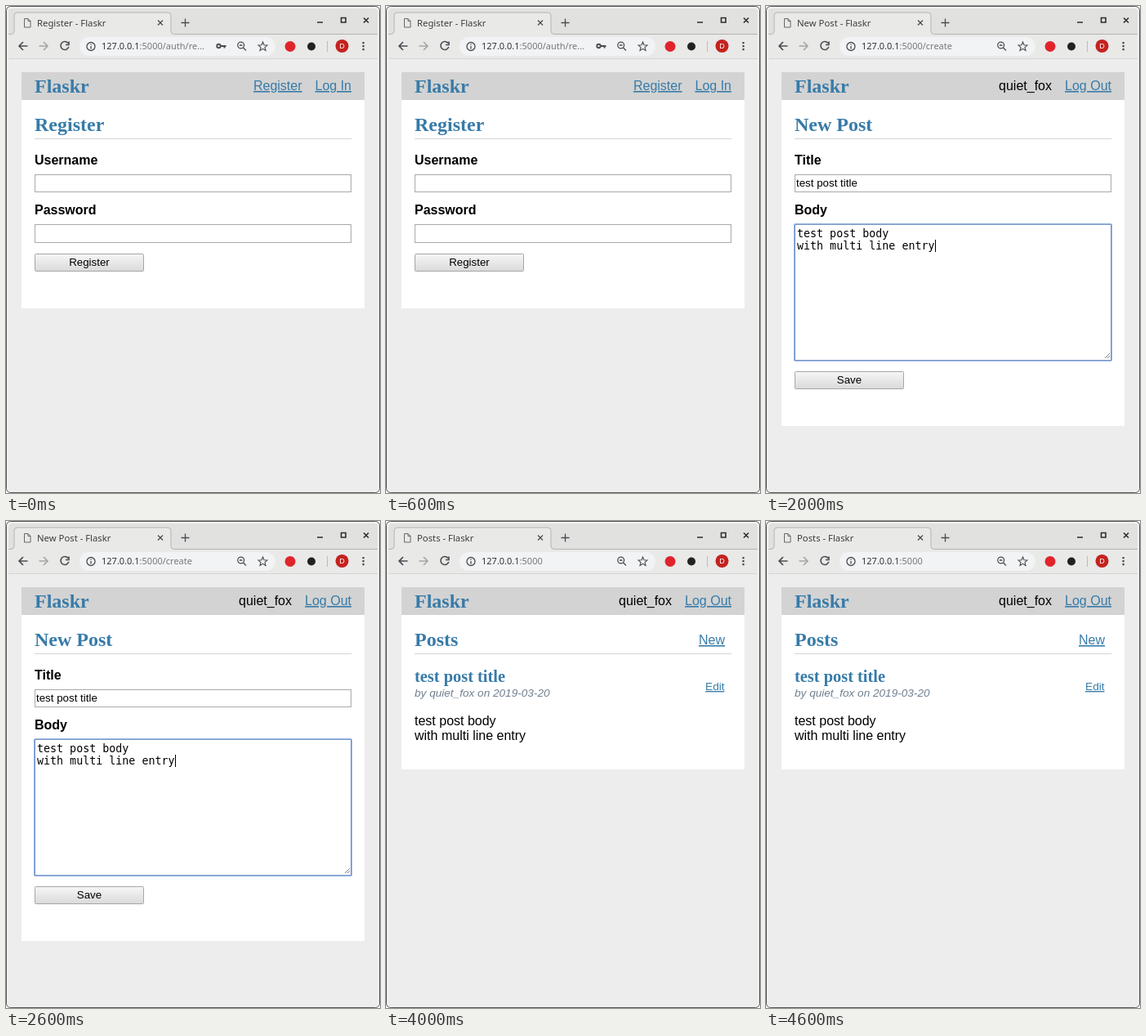
Write an HTML page that moves like this. It is 458x596 px and loops after 5 s.

```html
<!DOCTYPE html>
<html lang="en">
<head>
<meta charset="utf-8">
<title>Blog walkthrough</title>
<style>
html, body { margin: 0; width: 100%; height: 100%; overflow: hidden; background: #fff; }
svg { display: block; width: 458px; height: 596px; }
text { font: 16px "Liberation Sans", Arial, sans-serif; white-space: pre; }
.head { font: bold 24px "Liberation Serif", Times, serif; fill: #377ba8; }
.post { font-size: 20.4px; }
.label { font-weight: bold; }
.link { fill: #377ba8; text-decoration: underline; }
.field { font-size: 13.33px; }
.small { font-size: 13.6px; }
.about { font-size: 13.6px; font-style: italic; fill: #708090; }
.code { font: 13.33px "DejaVu Sans Mono", monospace; }
.tab { font: 11.3px "Noto Sans", sans-serif; fill: url(#fade); }
.url { font: 11px "Noto Sans", sans-serif; fill: #333; }
.icon { fill: none; stroke: #4a4d50; stroke-width: 1.3; }
</style>
</head>
<body>
<svg viewBox="0 0 458 596">
  <defs>
    <linearGradient id="fade" gradientUnits="userSpaceOnUse" x1="164" x2="181">
      <stop stop-color="#3c3c3c"/><stop offset="1" stop-color="#3c3c3c" stop-opacity="0"/>
    </linearGradient>
    <linearGradient id="face" x2="0" y2="1">
      <stop stop-color="#f6f6f6"/><stop offset="1" stop-color="#dadada"/>
    </linearGradient>
  </defs>
  <rect x=".5" y=".5" width="457" height="595" rx="5" fill="#f3f3f3" stroke="#555"/>
  <path d="M3 35V7q0-4 4-4H451q4 0 4 4V35z" fill="#e1e1e0"/>
  <path d="M3 34h452v30H3z" fill="#e9e9e8"/>
  <path d="M3 65h452v529H3z" fill="#ededed"/>
  <path d="M3 64.5H455" stroke="#d6d6d6"/>
  <path d="M3 34.5H6q4 0 4-4V12q0-4 4-4H198q4 0 4 4V30.500q0 4 4 4H455" fill="#e9e9e8" stroke="#b4b4b2"/>
  <rect x="90" y="38" width="240" height="23" rx="11.500" fill="#f1f3f4"/>
  <g class="icon">
    <path d="M22.500 15.500h4.500l3 3v7.500h-7.500zM27 15.500v3h3" stroke="#666" stroke-width="1"/>
    <path d="M186 17.500l6 6m0-6l-6 6M214.500 20.500h10m-5-5v10"/>
    <path d="M381 20h7M410.500 14.500h5.500v5.500h-5.500zM438 14.500l6 6m0-6l-6 6" stroke="#2e2e2e" stroke-width="1.6"/>
    <path d="M26.500 49H16m5-5l-5 5 5 5" stroke-width="1.6"/>
    <path d="M40.500 49H51m-5-5l5 5-5 5" stroke="#a5a5a5" stroke-width="1.6"/>
    <path d="M76 45.500a5 5 0 1 0 .8 4.500M77 43.500v4h-4" stroke-width="1.6"/>
    <circle cx="104" cy="49.500" r="5"/><path d="M104 49v3.500m0-6v1.300"/>
    <circle cx="287.700" cy="48" r="3.900"/><path d="M290.500 51l3.500 3.500M286 48h3.500"/>
    <path d="M314.500 44l1.500 3.700 4 .3-3 2.600 1 3.900-3.500-2.100-3.500 2.100 1-3.900-3-2.600 4-.3z" stroke-width="1.1"/>
    <path d="M393.500 43v13" stroke="#bbb" stroke-width="1"/>
  </g>
  <g id="key" class="icon"><circle cx="260.500" cy="49" r="2.200" stroke-width="1.900"/><path d="M263 49h6.500m-2 0v2.500" stroke-width="1.900"/></g>
  <circle cx="348" cy="49.500" r="6.500" fill="#e0242c"/>
  <circle cx="374" cy="49.500" r="5" fill="#222"/>
  <circle cx="411.500" cy="49" r="8" fill="#c5221f"/>
  <text x="411.500" y="52.300" text-anchor="middle" fill="#fff" style="font-size:9px">D</text>
  <path d="M436.500 44h2.200v2.200h-2.200zm0 4h2.200v2.200h-2.200zm0 4h2.200v2.200h-2.200z" fill="#444"/>
  <g id="page"></g>
</svg>
<script>
const user = "quiet_fox", title = "test post title";
const lines = ["test post body", "with multi line entry"];

const text = (x, y, cls, s, extra = "") => `<text x="${x}" y="${y}" class="${cls}" ${extra}>${s}</text>`;
const endText = (x, y, cls, s) => text(x, y, cls, s, 'text-anchor="end"');
const rect = (x, y, w, h, fill, extra = "") =>
  `<rect x="${x}" y="${y}" width="${w}" height="${h}" fill="${fill}" ${extra}/>`;
const box = (y, right, h, stroke = "#a9a9a9") => rect(35.5, y + .5, right - 36, h - 1, "#fff", `stroke="${stroke}"`);
const rule = (y, right) => rect(35, y, right - 35, 1, "#d3d3d3");
const button = (y, s, color = "#000") =>
  rect(35.5, y + .5, 133, 21, "url(#face)", 'stroke="#a6a6a6" rx="1"') +
  text(102, y + 15, "field", s, `text-anchor="middle" fill="${color}"`);

function frame(tab, path, head, bottom, right, signedIn) {
  return text(38, 24.5, "tab", tab) +
    text(117, 53, "url", `127.0.0.1<tspan fill="#777">:5000${path}</tspan>`) +
    rect(19, 81, right - 3, bottom - 81, "#fff") + rect(19, 81, right - 3, 34, "#d3d3d3") +
    text(35, 106, "head", "Flaskr") +
    (signedIn
      ? endText(right - 73, 103, "", user) + endText(right, 103, "link", "Log Out")
      : endText(right - 60.5, 103, "link", "Register") + endText(right, 103, "link", "Log In")) +
    text(35, 153, "head", head) + rule(162, right);
}

const account = (name, path) =>
  frame(name + " - Flaskr", path, name, 370, 423, false) +
  text(35, 194, "label", "Username") + box(206, 423, 22) +
  text(35, 255, "label", "Password") + box(267, 423, 23) + button(303, name);

function editor(tab, path, head, bottom, right, focused) {
  const ring = focused
    ? rect(35, 267, right - 35, 167, "none", 'rx="1" stroke="#7399d6" stroke-width="1.7"') + rect(207, 286, 1, 15, "#000")
    : "";
  return frame(tab, path, head, bottom, right, true) +
    text(35, 194, "label", "Title") + box(206, right, 22) + text(37, 221, "field", title) +
    text(35, 255, "label", "Body") + box(267, right, 167) +
    lines.map((s, i) => text(38, 283 + 15 * i, "code", s)).join("") + ring +
    `<path d="M${right - 8} 431l6-6m-3 6l3-3" stroke="#777" stroke-width=".9"/>` + button(447, "Save");
}

const scrollbar = rect(443, 65, 12, 529, "#f1f1f1") + rect(445, 77, 8, 498, "#c1c1c1") +
  '<path d="M446 73l3-4 3 4z" fill="#a3a3a3"/><path d="M446 584l3 4 3-4z" fill="#505050"/>';

const pages = [
  account("Register", "/auth/re…"),
  account("Log In", "/auth/lo…"),
  editor("New Post - Flaskr", "/create", "New Post", 514, 423, true),
  editor(`Edit "${title}" - Flaskr`, "/1/update", `Edit "${title}"`, 582, 411, false) +
    rule(498, 411) + button(515, "Delete", "#d01c38") + scrollbar,
  frame("Posts - Flaskr", "", "Posts", 304, 423, true) +
    endText(415, 151, "link", "New") + text(35, 197, "head post", title) +
    text(35, 215, "about", `by ${user} on 2019-03-20`) + endText(414.5, 207, "link small", "Edit") +
    lines.map((s, i) => text(35, 249.5 + 18.5 * i, "", s)).join("")
];

const page = document.getElementById("page"), key = document.getElementById("key");
let shown = -1;
function draw() {
  const n = Math.floor(performance.now() / 1000) % pages.length;
  if (n !== shown) {
    shown = n;
    page.innerHTML = pages[n];
    key.style.display = n < 2 ? "" : "none";
  }
  requestAnimationFrame(draw);
}
draw();
</script>
</body>
</html>
```
